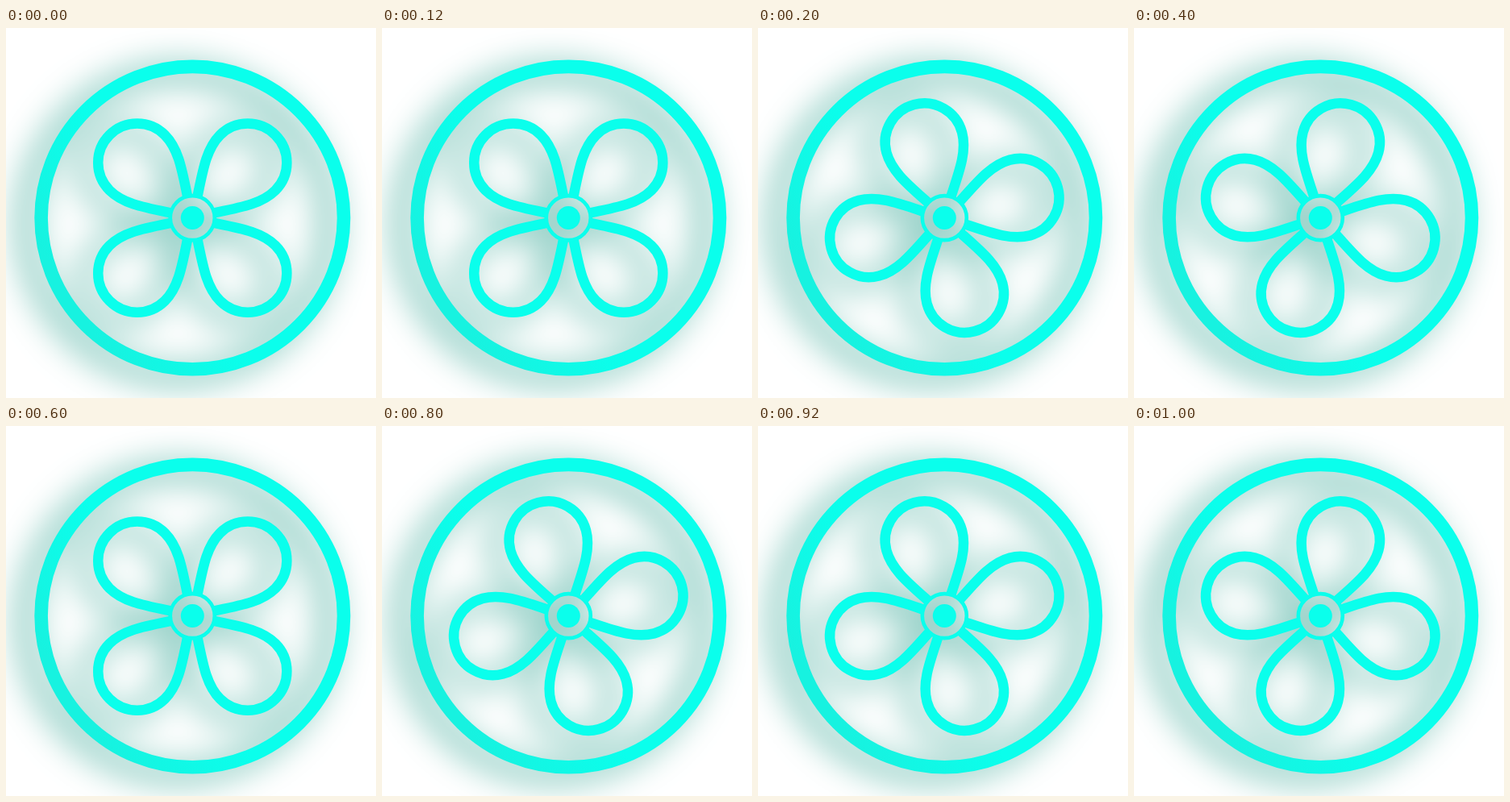
Recreate the animation shown at these times as an HTML page with a canvas. Size 459 by 459 pixels, loop 1200 ms.

```html
<!DOCTYPE html>
<html lang="en">
<head>
<meta charset="utf-8">
<title>Fan</title>
<style>
  html, body { margin: 0; width: 100%; height: 100%; overflow: hidden; background: #fff; }
  canvas { display: block; width: 459px; height: 459px; }
</style>
</head>
<body>
<canvas id="stage" width="459" height="459"></canvas>
<script>
const SIZE = 459, CX = 231.3, CY = 235.6;
const STEP_MS = 200, STEPS = 6, STEP_ANGLE = Math.PI / 6;
const CYAN = '#0affec';

const ctx = document.getElementById('stage').getContext('2d');
const layer = document.createElement('canvas');
layer.width = layer.height = SIZE;
const fan = layer.getContext('2d');

// Slightly dulled towards the lower left
const rim = fan.createLinearGradient(-150, 100, -25, 20);
rim.addColorStop(0, '#17f2e0');
rim.addColorStop(1, CYAN);

function disc(r, fill) {
  fan.beginPath();
  fan.arc(0, 0, r, 0, Math.PI * 2);
  fan.fillStyle = fill;
  fan.fill();
}

function ring(r, width, stroke) {
  fan.beginPath();
  fan.arc(0, 0, r, 0, Math.PI * 2);
  fan.lineWidth = width;
  fan.strokeStyle = stroke;
  fan.stroke();
}

// One petal along the positive x axis
function petal() {
  fan.beginPath();
  fan.moveTo(18, -11);
  fan.bezierCurveTo(50, -32, 72, -48.5, 97, -48.5);
  fan.arc(97, 0, 48.5, -Math.PI / 2, Math.PI / 2);
  fan.bezierCurveTo(72, 48.5, 50, 32, 18, 11);
  fan.lineWidth = 12.5;
  fan.strokeStyle = CYAN;
  fan.stroke();
}

function drawFan(angle) {
  fan.setTransform(1, 0, 0, 1, 0, 0);
  fan.clearRect(0, 0, SIZE, SIZE);
  fan.translate(CX, CY);
  ring(187.7, 16.6, rim);

  fan.save();
  fan.beginPath();
  fan.rect(-SIZE, -SIZE, SIZE * 2, SIZE * 2);
  fan.arc(0, 0, 27, 0, Math.PI * 2);
  fan.clip('evenodd');
  fan.rotate(angle - Math.PI / 4);
  for (let i = 0; i < 4; i++) {
    petal();
    fan.rotate(Math.PI / 2);
  }
  fan.restore();

  ring(27.5, 4.6, CYAN);
  disc(14.5, CYAN);
}

function render(step) {
  drawFan(step * STEP_ANGLE);
  ctx.fillStyle = '#fff';
  ctx.fillRect(0, 0, SIZE, SIZE);
  ctx.save();
  ctx.shadowColor = 'rgb(62, 170, 153)';
  ctx.shadowBlur = 43;
  ctx.shadowOffsetX = -18;
  ctx.shadowOffsetY = 8;
  ctx.drawImage(layer, 0, 0);
  ctx.restore();
}

let shown = -1;
function tick() {
  const step = Math.floor(performance.now() / STEP_MS) % STEPS;
  if (step !== shown) render(shown = step);
  requestAnimationFrame(tick);
}
tick();
</script>
</body>
</html>
```
